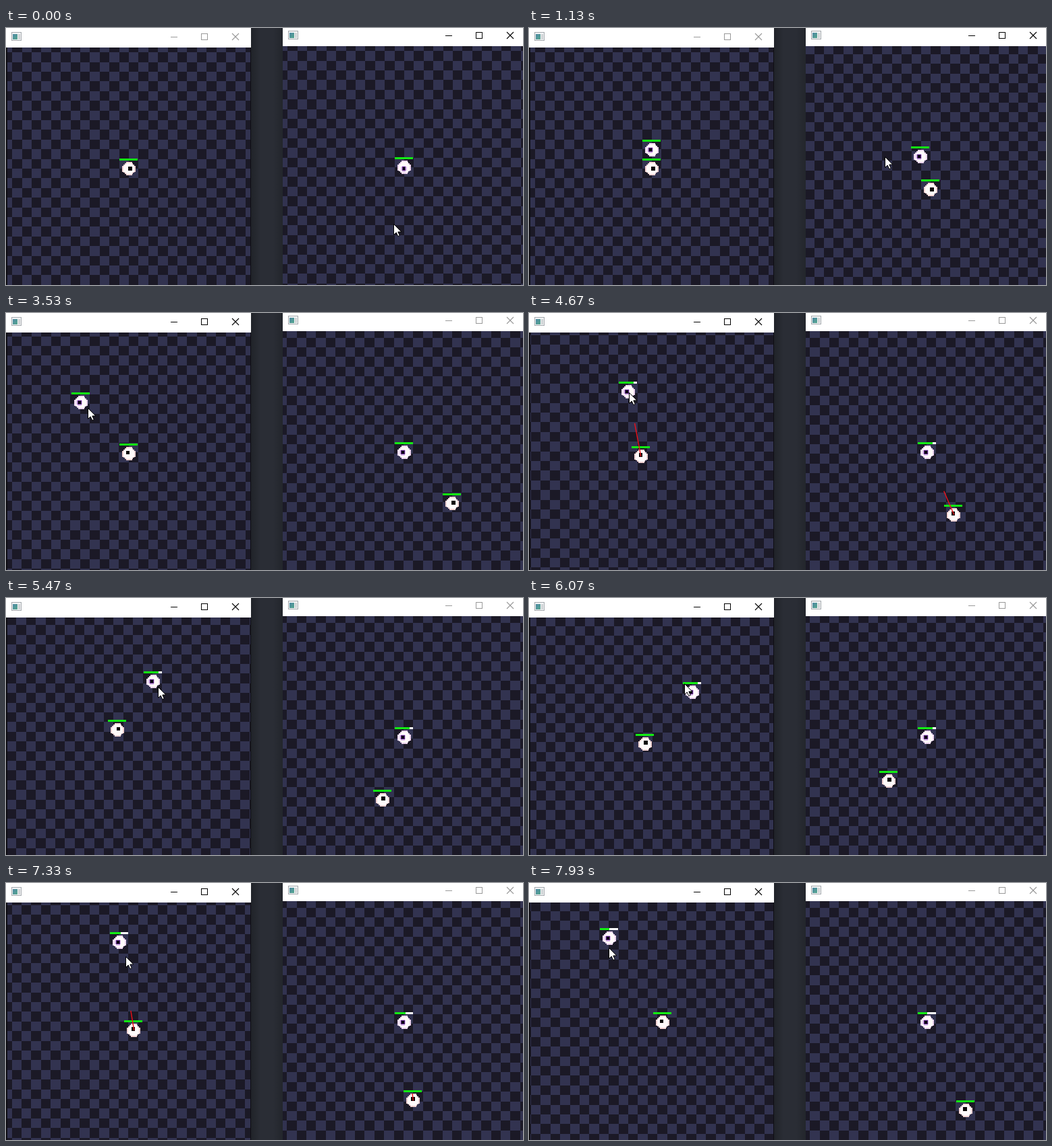
An HTML page with a canvas for the animation above (8000 ms loop, 766x382 px).

```html
<!DOCTYPE html>
<html lang="en">
<head>
<meta charset="utf-8">
<title>Two game windows</title>
<style>
  html, body { margin: 0; width: 100%; height: 100%; overflow: hidden; background: #2a2d35; }
  canvas { display: block; }
</style>
</head>
<body>
<canvas id="stage" width="766" height="382"></canvas>
<script>
const ctx = document.getElementById('stage').getContext('2d');
const LOOP = 8000, FPS = 15;
const PX = 1.8;            // screen pixels per game pixel
const TILE = 8 * PX;
const SPEED = 108;         // walking speed, px per second on each axis
const CAMERA_LAG = 0.157;
const NET_DELAY = 0.2;
const FOCUS_SWITCH = 1.95;
const LASER_TIME = 0.3;
const GAZE = 1.2;          // pupil offset in game pixels

// Walks as [start, end, direction], one list per axis.
const purple = {
  x: [[0.99, 1.38, -1]],
  y: [[0.676, 1.231, -1]],
  aim: t => t < FOCUS_SWITCH - 0.3 ? aimAtCursor(t, 590, 207) : [-GAZE, 0],
  health: t => 1 - 0.1 * shots.filter(s => t >= s).length,
  edge: '#ecd4ee',
  ring: true
};
const black = {
  x: [[2.027, 2.295, 1], [4.176, 4.673, -1], [4.816, 5.504, -1],
      [5.95, 6.126, -1], [6.307, 7.21, 1], [7.4, 8.2, 1]],
  y: [[2.147, 2.295, 1], [4.31, 4.497, 1], [5.24, 5.53, -1],
      [5.95, 6.195, 1], [6.9, 7.266, 1], [7.733, 7.789, -1]],
  aim: t => t < FOCUS_SWITCH ? [GAZE, 0] : aimAtCursor(t, 182, 209),
  health: () => 1,
  edge: '#f3d3d3'
};
const shots = [3.6, 4.52, 6.25, 7.1, 7.6];

const cursorPath = [
  [0, 575, 292], [0.07, 575, 292], [0.4, 530, 196], [1.13, 528, 192],
  [1.45, 528, 192], [1.95, 231, 225], [3.2, 231, 225], [3.6, 113, 135],
  [4.1, 113, 135], [4.67, 149, 119], [5.47, 226, 133], [6.73, 237, 123],
  [7.93, 119, 97], [8, 119, 97]
];

const views = [
  { x: 2, y: 29, frame: 0, width: 363, right: 362, icon: 8, buttons: 244,
    own: black, other: purple, focused: t => t >= FOCUS_SWITCH, laserShift: 0 },
  { x: 410, y: 27, frame: 410, width: 356, right: 766, icon: 418, buttons: 651,
    own: purple, other: black, focused: t => t < FOCUS_SWITCH, laserShift: 0.04 }
];

const ramp = s => Math.max(0, s);
const laggedRamp = s => s > 0 ? s - CAMERA_LAG * (1 - Math.exp(-s / CAMERA_LAG)) : 0;
const travel = (walks, t, curve) =>
  walks.reduce((sum, [a, b, dir]) => sum + dir * SPEED * (curve(t - a) - curve(t - b)), 0);
const place = (eye, t, curve = ramp) => [travel(eye.x, t, curve), travel(eye.y, t, curve)];

function cursorAt(t) {
  const i = Math.max(1, cursorPath.findIndex(k => k[0] >= t));
  const [t0, x0, y0] = cursorPath[i - 1], [t1, x1, y1] = cursorPath[i];
  let u = Math.min(1, Math.max(0, (t - t0) / (t1 - t0)));
  u = u * u * (3 - 2 * u);
  return [x0 + (x1 - x0) * u, y0 + (y1 - y0) * u];
}

// The walker leads its camera a little, so it is seldom exactly at the centre.
function aimAtCursor(t, cx, cy) {
  const eye = t < FOCUS_SWITCH ? purple : black;
  const pos = place(eye, t), cam = place(eye, t, laggedRamp), [mx, my] = cursorAt(t);
  const dx = mx - cx - pos[0] + cam[0], dy = my - cy - pos[1] + cam[1];
  const d = Math.hypot(dx, dy) || 1;
  return [GAZE * dx / d, GAZE * dy / d];
}

function rect(x0, y0, x1, y1, color) {
  const l = Math.round(x0), t = Math.round(y0);
  ctx.fillStyle = color;
  ctx.fillRect(l, t, Math.round(x1) - l, Math.round(y1) - t);
}

function line(color, width, ...points) {
  ctx.strokeStyle = color;
  ctx.lineWidth = width;
  ctx.beginPath();
  points.forEach(([x, y]) => ctx.lineTo(x, y));
  ctx.stroke();
}

function drawChecker(view, ox, oy) {
  rect(view.x, view.y, view.right, 382, '#323350');
  for (let j = Math.floor((view.y - oy) / TILE); oy + j * TILE < 382; j++)
    for (let i = Math.floor((view.x - ox) / TILE); ox + i * TILE < view.right; i++)
      if (i + j & 1)
        rect(ox + i * TILE, oy + j * TILE, ox + (i + 1) * TILE, oy + (j + 1) * TILE, '#1b1926');
}

function drawDisc(x, y, halfWidths, color) {
  const n = halfWidths.length / 2;
  halfWidths.forEach((w, i) =>
    rect(x - w * PX, y + (i - n) * PX, x + w * PX, y + (i - n + 1) * PX, color));
}

function drawEye(eye, x, y, t) {
  x = Math.round(x - 0.25);
  y = Math.round(y - 0.25);
  drawDisc(x, y, [2.5, 3.5, 4.5, 5.5, 5.5, 5.5, 5.5, 5.5, 4.5, 3.5, 2.5], eye.edge);
  drawDisc(x, y, [2.5, 3.5, 4.5, 4.5, 4.5, 4.5, 4.5, 3.5, 2.5], '#fffafa');
  const [ax, ay] = eye.aim(t), px = x + ax * PX, py = y + ay * PX;
  if (eye.ring) {
    drawDisc(px, py, [1.5, 2.5, 2.5, 2.5, 1.5], '#dcbcec');
    drawDisc(px, py, [1.5, 1.5, 1.5], '#56277a');
    drawDisc(px, py, [1, 1], '#0c0412');
  } else {
    drawDisc(px, py, [1.5, 1.5, 1.5], '#0d0808');
  }
  rect(x - 14, y - 15, x + 13, y - 12, '#fff');
  rect(x - 14, y - 15, x - 14 + 27 * eye.health(t), y - 12, '#12ee12');
}

function drawLaser(from, to, t) {
  const shot = shots.find(s => t >= s && t < s + LASER_TIME);
  if (!shot) return;
  const u = 1 - (t - shot) / LASER_TIME;
  line('#ee1018', 1.4, from, [from[0] + (to[0] - from[0]) * u, from[1] + (to[1] - from[1]) * u]);
}

function drawTitleBar(view, t) {
  const { y, icon, buttons: b } = view, mid = y - 16;
  rect(view.frame, 0, view.frame + view.width, y, '#fff');
  rect(icon, mid - 7, icon + 15, mid + 6, '#a4a9ad');
  rect(icon + 1, mid - 6, icon + 14, mid + 5, '#f4f5f6');
  const teal = ctx.createLinearGradient(icon, mid - 4, icon + 10, mid + 5);
  teal.addColorStop(0, '#4f86a8');
  teal.addColorStop(1, '#55a98a');
  rect(icon + 2, mid - 4, icon + 9, mid + 4, teal);
  rect(icon + 10, mid - 4, icon + 13, mid + 4, '#cfd4d6');

  const ink = view.focused(t) ? '#000' : '#999';
  rect(b, mid, b + 10, mid + 1, ink);
  ctx.strokeStyle = ink;
  ctx.lineWidth = 1;
  ctx.strokeRect(b + 45.5, mid - 4.5, 9, 9);
  line(ink, 1.1, [b + 91, mid - 5], [b + 101, mid + 5]);
  line(ink, 1.1, [b + 101, mid - 5], [b + 91, mid + 5]);
}

function drawView(view, t) {
  const cam = place(view.own, t, laggedRamp);
  const ox = view.x + 180 - cam[0], oy = view.y + 180 - cam[1];
  const toScreen = ([x, y]) => [ox + x, oy + y];
  const own = toScreen(place(view.own, t));
  const other = toScreen(place(view.other, t - NET_DELAY));

  rect(view.frame, 0, view.frame + view.width, 382, '#0e0d13');
  ctx.save();
  ctx.beginPath();
  ctx.rect(view.x, view.y, view.right - view.x, 382 - view.y);
  ctx.clip();
  drawChecker(view, ox, oy);
  drawEye(view.other, ...other, view.other === black ? t - NET_DELAY : t);
  drawEye(view.own, ...own, t);
  const [from, to] = view.own === black ? [own, other] : [other, own];
  drawLaser(from, to, t + view.laserShift);
  ctx.restore();
  drawTitleBar(view, t);
}

function drawGap() {
  const shade = ctx.createLinearGradient(363, 0, 410, 0);
  shade.addColorStop(0, '#202329');
  shade.addColorStop(0.3, '#2a2d35');
  shade.addColorStop(0.7, '#2a2d35');
  shade.addColorStop(1, '#23262c');
  rect(363, 0, 410, 382, shade);
}

function drawCursor(x, y) {
  ctx.save();
  ctx.translate(Math.round(x) - 1, Math.round(y) - 1);
  const arrow = new Path2D('M.5 .5V16.5L4.2 13L6.8 18.6L9.3 17.5L6.8 12H11.8Z');
  ctx.fillStyle = '#fff';
  ctx.strokeStyle = '#000';
  ctx.lineWidth = 1;
  ctx.fill(arrow);
  ctx.stroke(arrow);
  ctx.restore();
}

function render(now) {
  const t = Math.floor((now % LOOP + 3.4) * FPS / 1000) / FPS;
  drawGap();
  views.forEach(view => drawView(view, t));
  drawCursor(...cursorAt(t));
  requestAnimationFrame(render);
}
requestAnimationFrame(render);
</script>
</body>
</html>
```
